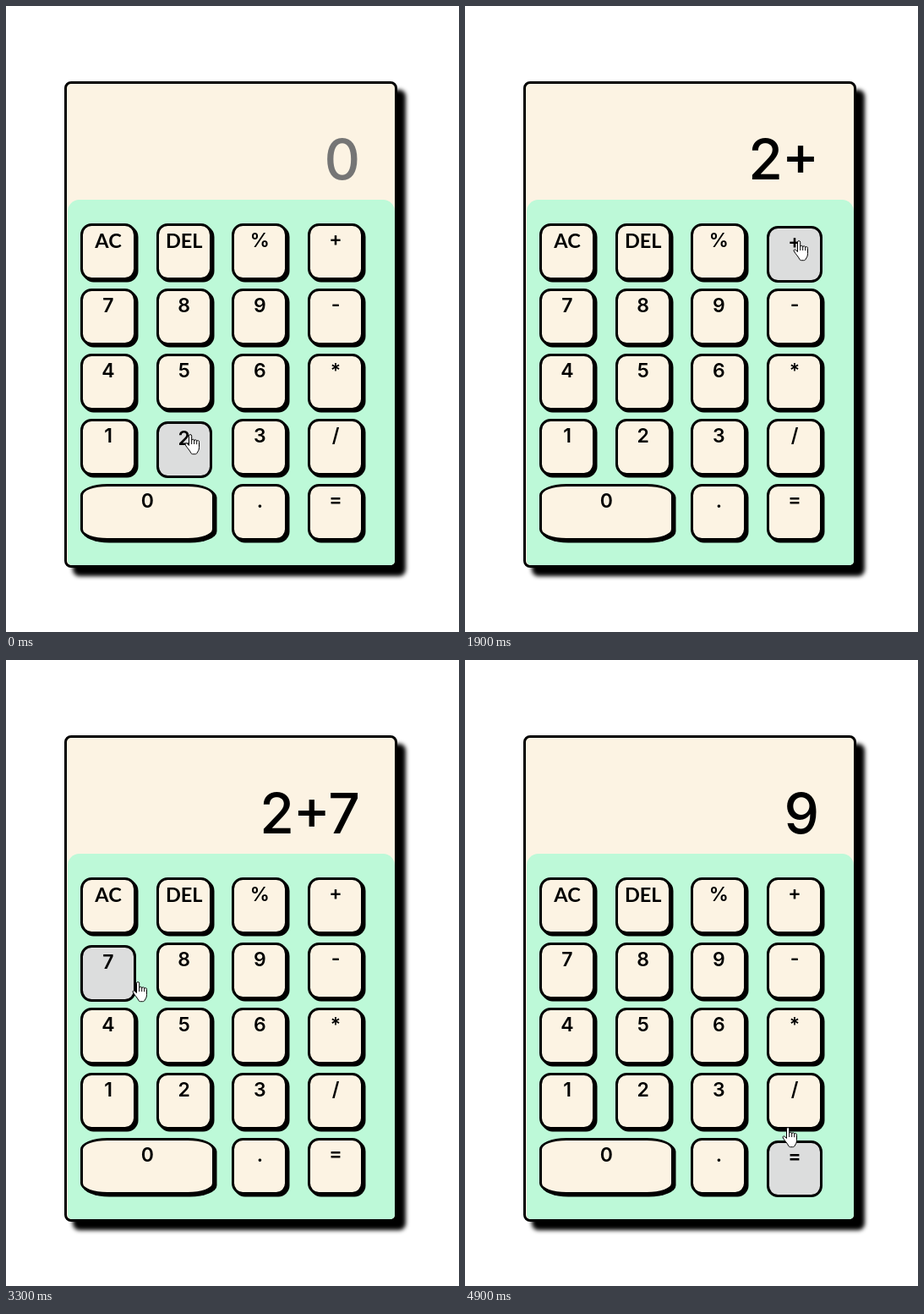
Recreate the animation shown at these times as an HTML page. Size 536 by 740 pixels, loop 5000 ms.

```html
<!DOCTYPE html>
<html lang="en">
<head>
<meta charset="utf-8">
<title>Calculator</title>
<style>
  :root {
    --cream: #fcf3e3;
    --mint: #bdf9d8;
    --down: #dcdddd;
    --drop: 2.5px 2.5px 0 #000;
    --flat: 0 0 0 #000;
    --loop: 5s infinite;
  }

  * { box-sizing: border-box; }

  html, body {
    width: 100%;
    height: 100%;
    margin: 0;
    overflow: hidden;
    background: #fff;
  }

  .body {
    position: absolute;
    left: 69px;
    top: 89px;
    width: 394px;
    height: 575px;
    border: 3px solid #000;
    border-radius: 8px;
    background: var(--cream);
    box-shadow: 10px 10px 5px #000;
  }

  .panel {
    position: absolute;
    left: 73px;
    top: 229px;
    width: 387px;
    height: 432px;
    border-radius: 14px 14px 5px 5px;
    background: var(--mint);
  }

  /* The readout is a reel of lines, one showing at a time */
  .screen {
    position: absolute;
    left: 90px;
    top: 131px;
    width: 328px;
    height: 98px;
    overflow: hidden;
    font: 450 66px/100px Inter, sans-serif;
    font-feature-settings: "case";
    letter-spacing: -1px;
    text-align: right;
  }

  .reel { animation: reel var(--loop) step-end; }
  .reel div { height: 100px; }
  .reel .hint { color: #757575; }

  @keyframes reel {
    0% { transform: none; }
    17% { transform: translateY(-100px); }
    32% { transform: translateY(-200px); }
    58% { transform: translateY(-300px); }
    90%, 100% { transform: translateY(-400px); }
  }

  .keys {
    position: absolute;
    left: 88px;
    top: 257.2px;
    display: grid;
    grid-template-columns: repeat(4, 66px);
    grid-auto-rows: 67px;
    gap: 10px 23.7px;
  }

  .key {
    border: 3px solid #000;
    border-radius: 20%;
    background: var(--cream);
    box-shadow: var(--drop);
    font: 600 23px/34px Inter, sans-serif;
    font-feature-settings: "case";
    text-align: center;
    white-space: nowrap;
  }

  .word { font: 700 23.5px/34px Lato, sans-serif; }
  .star { font-feature-settings: normal; }
  .zero { grid-column: span 2; width: 158.5px; }

  .two { animation: two var(--loop); }
  .plus { animation: plus var(--loop); }
  .eight { animation: eight var(--loop); }
  .seven { animation: seven var(--loop); }
  .equals { animation: equals var(--loop); }

  /* Hover: the shadow goes at once, tint and drop take 300 ms */
  @keyframes two {
    0%, 21.5% { background: var(--down); transform: translateY(3px); }
    0%, 21.5% { box-shadow: var(--flat); }
    21.51%, 100% { box-shadow: var(--drop); }
    27.5%, 100% { background: var(--cream); transform: translateY(0); }
  }

  @keyframes plus {
    0%, 23.6% { background: var(--cream); transform: translateY(0); box-shadow: var(--drop); }
    23.61%, 43.5% { box-shadow: var(--flat); }
    29.6%, 43.5% { background: var(--down); transform: translateY(3px); }
    43.51%, 100% { box-shadow: var(--drop); }
    49.5%, 100% { background: var(--cream); transform: translateY(0); }
  }

  @keyframes eight {
    0%, 45.6% { background: var(--cream); transform: translateY(0); box-shadow: var(--drop); }
    45.61%, 48.5% { box-shadow: var(--flat); }
    48.5% { background: #ebe7e0; transform: translateY(1.6px); }
    48.51%, 100% { box-shadow: var(--drop); }
    52%, 100% { background: var(--cream); transform: translateY(0); }
  }

  @keyframes seven {
    0%, 49% { background: var(--cream); transform: translateY(0); box-shadow: var(--drop); }
    49.01%, 67% { box-shadow: var(--flat); }
    55%, 67% { background: var(--down); transform: translateY(3px); }
    67.01%, 100% { box-shadow: var(--drop); }
    73%, 100% { background: var(--cream); transform: translateY(0); }
  }

  @keyframes equals {
    0%, 73% { background: var(--cream); transform: translateY(0); box-shadow: var(--drop); }
    73.01%, 100% { box-shadow: var(--flat); }
    79%, 100% { background: var(--down); transform: translateY(3px); }
  }

  .hand {
    position: absolute;
    left: 0;
    top: 0;
    width: 19px;
    height: 25px;
    fill: #fff;
    stroke: #000;
    stroke-linejoin: round;
    animation: hand var(--loop) ease-in-out;
  }

  @keyframes hand {
    0%, 20.6% { transform: translate(211px, 506px); }
    24%, 25.4% { transform: translate(384px, 317px); }
    27.5%, 42.5% { transform: translate(388px, 277px); }
    46%, 47.4% { transform: translate(209px, 388px); }
    50%, 63.5% { transform: translate(115px, 362px); }
    66%, 67.4% { transform: translate(149px, 380px); }
    74.5%, 96% { transform: translate(379px, 599px); }
    97.9%, 100% { transform: translate(375px, 552px); }
  }
</style>
</head>
<body>
  <div class="body"></div>
  <div class="panel"></div>

  <div class="screen">
    <div class="reel">
      <div class="hint">0</div>
      <div>2</div>
      <div>2+</div>
      <div>2+7</div>
      <div>9</div>
    </div>
  </div>

  <div class="keys">
    <div class="key word">AC</div>
    <div class="key word">DEL</div>
    <div class="key">%</div>
    <div class="key plus">+</div>
    <div class="key seven">7</div>
    <div class="key eight">8</div>
    <div class="key">9</div>
    <div class="key">-</div>
    <div class="key">4</div>
    <div class="key">5</div>
    <div class="key">6</div>
    <div class="key star">*</div>
    <div class="key">1</div>
    <div class="key two">2</div>
    <div class="key">3</div>
    <div class="key">/</div>
    <div class="key zero">0</div>
    <div class="key">.</div>
    <div class="key equals">=</div>
  </div>

  <svg class="hand" viewBox="0 0 19 25">
    <path d="M5.5 13.5V2.2a1.6 1.6 0 0 1 3.2 0V7.6a1.5 1.5 0 0 1 3 .4a1.5 1.5 0 0 1 3 .7a1.45 1.45 0 0 1 2.8 .9V15.5c0 4-1.6 5-2.4 6.8c-.6 1.2-1.3 1.4-2.6 1.4h-2.2c-1.4 0-2-.4-2.6-1.6C6.5 19.500 3.500 16.500 1.300 13c-1-1.600.8-2.800 2.100-1.700z"/>
    <path fill="none" d="M8.700 7.600v4.400M11.700 8v4M14.700 8.700v3.500"/>
  </svg>
</body>
</html>
```
